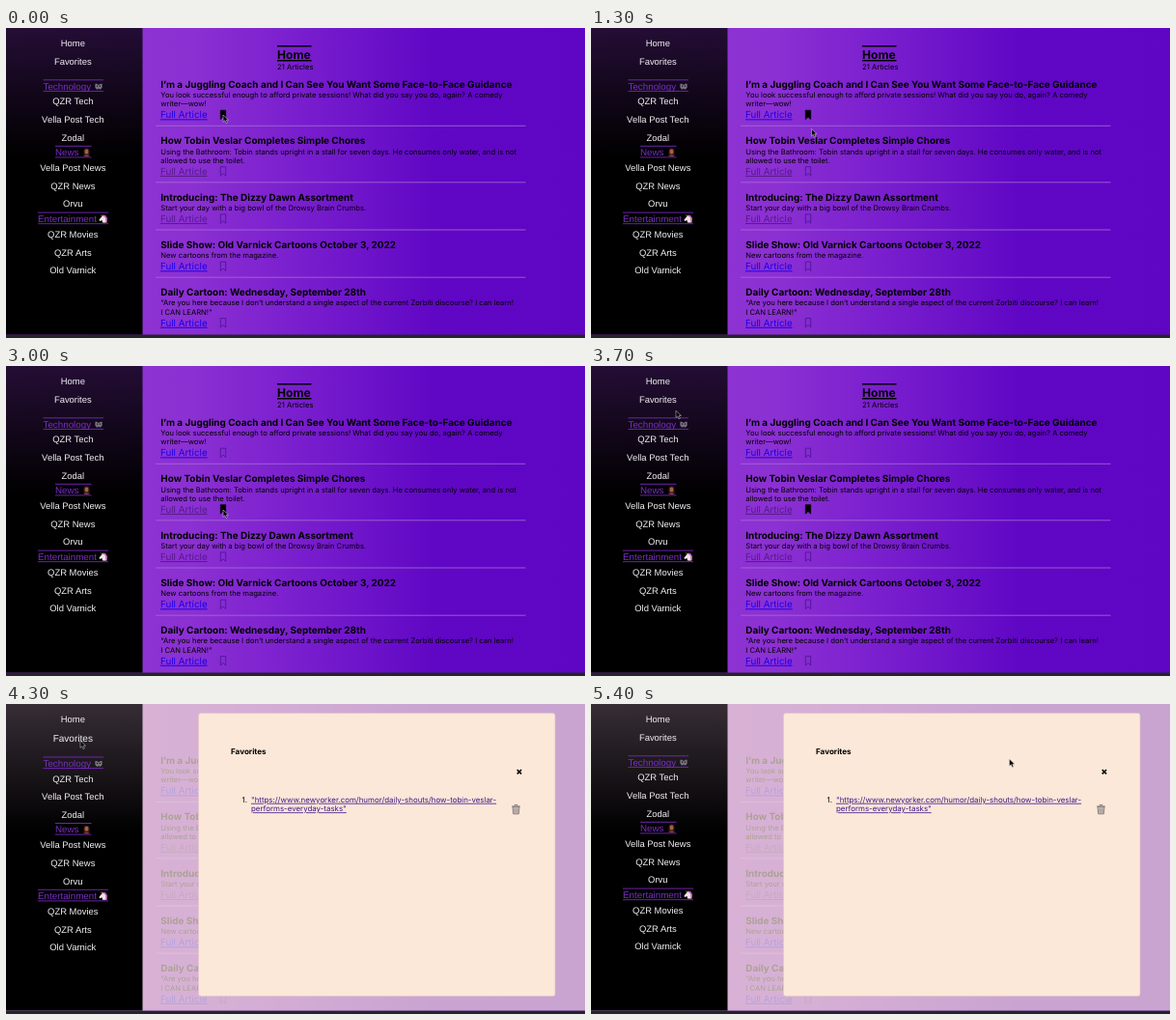
Recreate the animation shown at these times as an HTML page. Size 600 px wide and 321 px high, loop 5500 ms.

```html
<!DOCTYPE html>
<html lang="en">
<head>
<meta charset="utf-8">
<title>News reader</title>
<style>
  html, body { margin: 0; height: 100%; overflow: hidden; background: #25232c; }
  svg { display: block; width: 100vw; height: 100vh; text-rendering: geometricPrecision; }
  text { font-family: Inter, "Open Sans", sans-serif; }
  .nav text { font-family: "Liberation Sans", Arial, sans-serif; font-size: 9.45px; fill: #f2eff4; text-anchor: middle; }
  .nav .topic { font-size: 9.8px; fill: #7a2fc4; text-anchor: start; }
  .title { font-size: 9.95px; font-weight: 700; }
  .body { font-size: 7.63px; }
  .link { font-size: 9.8px; fill: #1b00ee; text-decoration: underline; }
  .seen { fill: #551a8b; }
  .url { font-size: 7.9px; fill: #42158a; text-decoration: underline; }
</style>
</head>
<body>
<svg viewBox="0 0 600 321" preserveAspectRatio="none">
  <defs>
    <linearGradient id="violet">
      <stop offset="0" stop-color="#9337d4"/>
      <stop offset=".32" stop-color="#8b30d2"/>
      <stop offset=".5" stop-color="#7a1fce"/>
      <stop offset=".74" stop-color="#6007c5"/>
      <stop offset="1" stop-color="#5f05c4"/>
    </linearGradient>
    <linearGradient id="shade" x2="0" y2="1">
      <stop offset="0" stop-opacity=".75"/>
      <stop offset=".42" stop-opacity="1"/>
    </linearGradient>
  </defs>
  <rect width="600" height="317.5" fill="url(#violet)"/>
  <g id="page">
    <path d="M281 18.7h35.5M281 33.8h35.5" stroke="#000" stroke-width="1.4"/>
    <text x="281" y="32" font-size="12.1" font-weight="700">Home</text>
    <text x="281" y="43" font-size="7.7">21 Articles</text>
  </g>
  <rect id="veil" width="600" height="317.5" fill="#faebd7" opacity=".69"/>
  <rect width="141.5" height="317.5" fill="url(#shade)"/>
  <g class="nav" id="nav"></g>
  <g id="dialog">
    <rect x="199.5" y="9.5" width="369.5" height="293" rx="2.5" fill="#fbe8d8" stroke="#e3c3cb" stroke-width=".6"/>
    <text x="233" y="51.6" font-size="8.1" font-weight="700">Favorites</text>
    <path d="M529.7 68l4.4 4.4m0-4.4l-4.4 4.4" stroke="#000" stroke-width="1.5"/>
    <text x="244.5" y="101.8" font-size="7.9">1.</text>
    <text class="url" x="254" y="101.8">"https://www.newyorker.com/humor/daily-shouts/how-tobin-veslar-</text>
    <text class="url" x="254" y="111.3">performs-everyday-tasks"</text>
    <g fill="none" stroke="#7d7674" stroke-width=".9">
      <path d="M524 106h9M527 105.6v-1.1h3v1.1"/>
      <path d="M525 106.5l.7 7.3h5.6l.7-7.3z" fill="#c9bdb4"/>
      <path d="M527.3 108v4.5m2.4-4.5v4.5" stroke-width=".6"/>
    </g>
  </g>
  <path id="cursor" d="M0 0V7.3L1.8 5.7 3.1 8.6 4.4 8 3.2 5.2H5.5Z" stroke="#ddd" stroke-width=".5"/>
</svg>
<script>
(() => {
  const $ = id => document.getElementById(id);

  function add(parent, tag, attrs, content = '') {
    const el = document.createElementNS('http://www.w3.org/2000/svg', tag);
    for (const name in attrs) el.setAttribute(name, attrs[name]);
    el.textContent = content;
    return parent.appendChild(el);
  }

  const articles = [
    { title: 'I’m a Juggling Coach and I Can See You Want Some Face-to-Face Guidance',
      lines: ['You look successful enough to afford private sessions! What did you say you do, again? A comedy', 'writer—wow!'] },
    { title: 'How Tobin Veslar Completes Simple Chores', seen: true,
      lines: ['Using the Bathroom: Tobin stands upright in a stall for seven days. He consumes only water, and is not', 'allowed to use the toilet.'] },
    { title: 'Introducing: The Dizzy Dawn Assortment', seen: true,
      lines: ['Start your day with a big bowl of the Drowsy Brain Crumbs.'] },
    { title: 'Slide Show: Old Varnick Cartoons October 3, 2022',
      lines: ['New cartoons from the magazine.'] },
    { title: 'Daily Cartoon: Wednesday, September 28th',
      lines: ['“Are you here because I don’t understand a single aspect of the current Zorbiti discourse? I can learn!', 'I CAN LEARN!”'] }
  ];

  let rowY = 58;
  const marks = articles.map(({ title, lines, seen }, i) => {
    const page = $('page'), x = 160.3, extra = (lines.length - 1) * 9.3;
    add(page, 'text', { class: 'title', x, y: rowY + 3.6 }, title);
    lines.forEach((line, n) => add(page, 'text', { class: 'body', x, y: rowY + 14 + n * 9.3 }, line));
    const y = rowY + 22.5 + extra;
    add(page, 'text', { class: seen ? 'link seen' : 'link', x: 160, y: y + 3.6 }, 'Full Article');
    if (i < 4) add(page, 'path', { d: `M155 ${y + 11.5}H538.5`, stroke: '#a56fd6', 'stroke-width': .8 });
    rowY += 49.2 + extra;
    return add(page, 'path', { d: `M222.3 ${y - 4.6}h5.4v9.4l-2.7-2.5-2.7 2.5z`, 'stroke-width': .7 });
  });

  // Plain entries are [label, centre y]; topics also have left and right edges.
  const navItems = [
    ['Home', 16], ['Favorites', 35],
    ['Technology', 60.3, 38.5, 101], ['QZR Tech', 76], ['Vella Post Tech', 94.6], ['Zodal', 113.2],
    ['News', 128.8, 51, 88.5], ['Vella Post News', 144.8], ['QZR News', 163.4], ['Orvu', 182],
    ['Entertainment', 197.6, 33, 106], ['QZR Movies', 213.6], ['QZR Arts', 232.2], ['Old Varnick', 250.8]
  ];
  const icons = {
    Technology: [['#77717f', 'M-3.6-2.5h2l1 1h1.2l1-1h2v4l-1.5 1.8h-1.3l-.8-1-.8 1h-1.3l-1.5-1.8z'], ['#1b1620', 'M-2-.8h1.2v1.2h-1.2zM.8-.8h1.2v1.2h-1.2z']],
    News: [['#3a2018', 'M-3 4v-5a3 3.2 0 0 1 6 0v5z'], ['#a8623c', 'M-1.9-.8a1.9 2.4 0 0 1 3.8 0a1.9 2.6 0 0 1-3.8 0z'], ['#8c4630', 'M-3 4.2q3-3 6 0z']],
    Entertainment: [['#c766b4', 'M-1-4l3 .5 2 3-.3 4.5h-3z'], ['#eee4ea', 'M-.5-3l2.5 2 .5 5h-3.5l-.5-2.5-2.3 1-.8-1.3 2.6-3.2z'], ['#d9a950', 'M-1.5-2.5l-1.8-2.2 2.7 1.5z']]
  };
  const belowFavorites = add($('nav'), 'g', {});
  let favorites;
  navItems.forEach(([label, y, left, right], i) => {
    const group = i < 2 ? $('nav') : belowFavorites;
    if (!left) {
      const el = add(group, 'text', { x: 69.3, y: y + 3.4 }, label);
      if (i === 1) favorites = el;
      return;
    }
    add(group, 'path', { d: `M${left} ${y - 6.5}H${right}M${left} ${y + 5.1}H${right}`, stroke: '#7429bb', 'stroke-width': .9 });
    add(group, 'text', { class: 'topic', x: left, y: y + 3.5 }, label);
    for (const [fill, d] of icons[label])
      add(group, 'path', { d, fill, transform: `translate(${right - 5} ${y})` });
  });

  // Pointer stops: time, x, y
  const stops = [
    [0, 225, 90], [200, 225, 90], [600, 228.5, 104.5], [1300, 228.5, 104.5], [1700, 224.5, 89.5],
    [2200, 224.5, 89.5], [2700, 225, 149], [3200, 225, 149], [3800, 77, 38],
    [4800, 77, 38], [5300, 433.5, 57], [5500, 433.5, 57]
  ];
  function pointerAt(t) {
    const i = stops.findIndex(stop => stop[0] > t);
    const [t0, x0, y0] = stops[i - 1], [t1, x1, y1] = stops[i];
    const p = (t - t0) / (t1 - t0), e = p * p * (3 - 2 * p);
    return [x0 + (x1 - x0) * e, y0 + (y1 - y0) * e];
  }

  function draw(time) {
    const t = Math.floor(time % 5500 / 100) * 100;
    const [x, y] = pointerAt(t);
    $('cursor').setAttribute('transform', `translate(${x} ${y})`);

    marks.forEach((mark, i) => {
      const saved = i === 0 && t < 1900 || i === 1 && t >= 2900;
      mark.setAttribute('fill', saved ? '#000' : 'none');
      mark.setAttribute('stroke', saved ? '#000' : '#40108c');
    });

    const hover = t >= 3800 && t < 5000;
    favorites.style.fontSize = hover ? '10.05px' : '';
    favorites.setAttribute('y', hover ? 39.4 : 38.4);
    belowFavorites.setAttribute('transform', `translate(0 ${hover ? 1.2 : 0})`);

    $('veil').style.display = $('dialog').style.display = t >= 4300 ? '' : 'none';
  }

  const start = performance.now();
  function tick() {
    draw(performance.now() - start);
    requestAnimationFrame(tick);
  }
  tick();
})();
</script>
</body>
</html>
```
